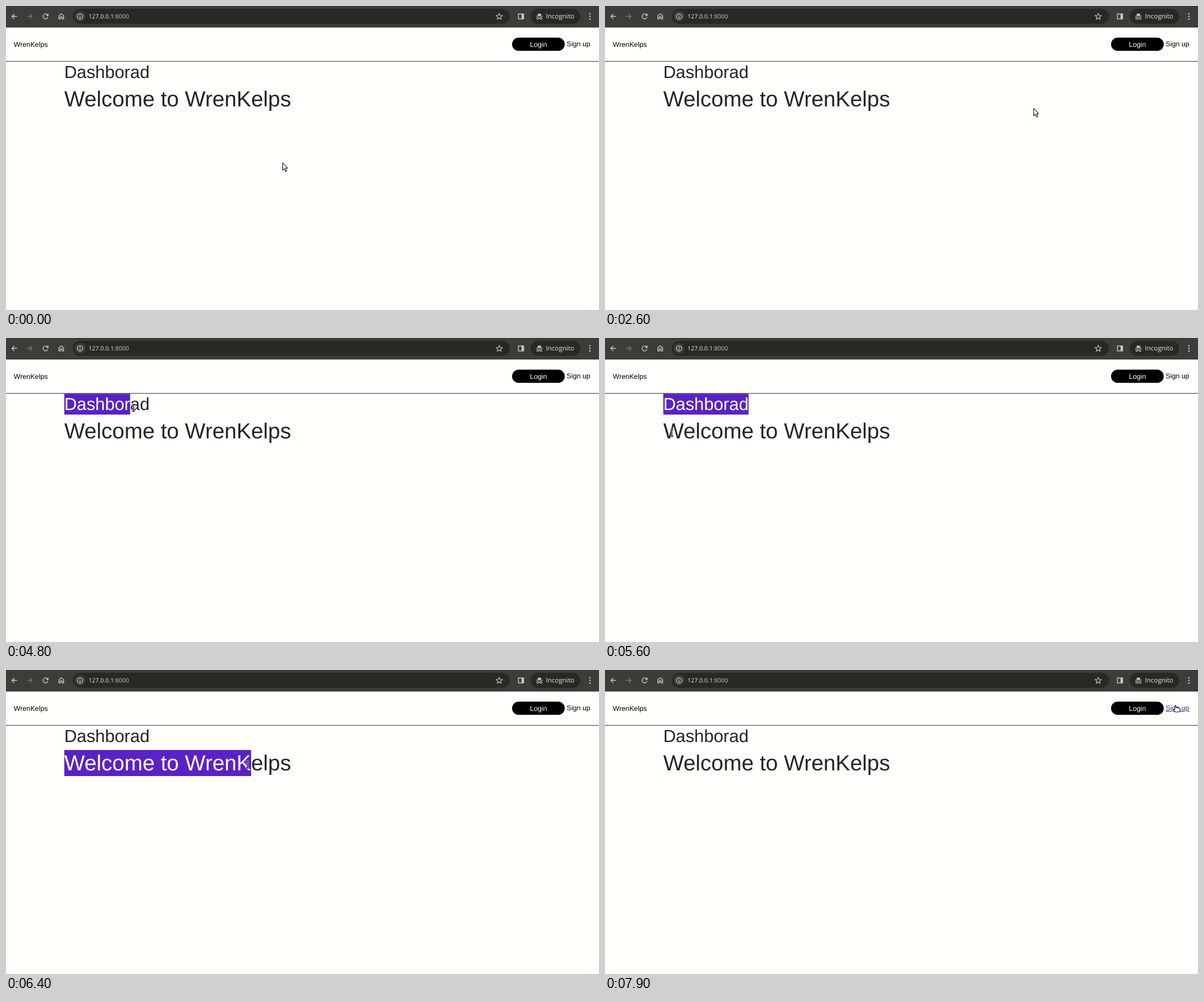
Animation, 1045 px wide and 536 px high, one loop 8 s. Source, as an HTML page:

```html
<!DOCTYPE html>
<html lang="en">
<head>
<meta charset="utf-8">
<title>Dashboard</title>
<style>
  html, body { margin: 0; width: 100%; height: 100%; overflow: hidden; background: #fffffb; }
  svg { display: block; width: 1045px; height: 536px; }
  text { font-family: "Liberation Sans", Arial, sans-serif; text-rendering: geometricPrecision; }
  .bar text { font-family: "Open Sans", "Noto Sans", sans-serif; fill: #e6e6e2; }
  .nav { font-size: 12.29px; }
  .h2 { font-size: 30.72px; }
  .h1 { font-size: 38.4px; }
  .icon { fill: none; stroke: #cbcbc6; stroke-width: 1.4; }
  .dim { stroke: #787874; }
  .thin { stroke-width: 1.1; }
  .dark { fill: #212529; }
  .hover { fill: #2b3f92; text-decoration: underline; }
  #cursors path { stroke-linejoin: round; }
</style>
</head>
<body>
<svg viewBox="0 0 1045 536">
  <rect width="1045" height="536" fill="#fffffb"/>

  <g class="bar">
    <rect width="1045" height="37.6" fill="#3c3c38"/>
    <rect width="1045" height="1" fill="#32322f"/>
    <rect y="36.6" width="1045" height="1" fill="#2b2b28"/>
    <rect x="117.5" y="5" width="770.5" height="26.5" rx="13.25" fill="#282824"/>
    <rect x="924.5" y="5" width="87.5" height="26.5" rx="13.25" fill="#282824"/>
    <circle cx="130.5" cy="18.3" r="9.5" fill="#3c3c38"/>
    <g class="icon">
      <path d="M19.5 18.3H10.5M14.7 13.9L10.3 18.3L14.7 22.7"/>
      <path class="dim" d="M37 18.3H46M41.8 13.9L46.2 18.3L41.8 22.7"/>
      <path d="M73.3 15.6A4.4 4.4 0 1 0 74 19.6M74.2 13.3V16.8H70.6"/>
      <path d="M93.3 22.9V17L97.4 13.8L101.5 17V22.9H98.9V19.2H95.9V22.9Z"/>
      <circle cx="130.5" cy="18.3" r="4.7"/>
      <path d="M130.5 17.7V21M130.5 15.5V16.8"/>
      <path class="thin" d="M869.2 13L870.7 16.6L874.6 16.9L871.6 19.5L872.5 23.3L869.2 21.2L865.9 23.3L866.8 19.5L863.8 16.9L867.7 16.6Z"/>
      <rect x="903" y="14" width="9" height="8.8"/>
      <g class="thin">
        <path d="M934 18H946M939 21.2H941"/>
        <circle cx="937.2" cy="21.8" r="1.8"/>
        <circle cx="942.8" cy="21.8" r="1.8"/>
      </g>
    </g>
    <g fill="#cbcbc6">
      <rect x="908.5" y="14" width="4" height="9"/>
      <path d="M936.5 17L937.6 13.2L940 13.8L942.4 13.2L943.5 17Z"/>
      <circle cx="1029" cy="13.7" r="1.3"/>
      <circle cx="1029" cy="18.3" r="1.3"/>
      <circle cx="1029" cy="22.9" r="1.3"/>
    </g>
    <text x="145.5" y="22" font-size="10.5">127.0.0.1<tspan fill="#c2c2be">:8000</tspan></text>
    <text x="951.5" y="22" font-size="11.5">Incognito</text>
  </g>

  <g class="nav">
    <text x="13.8" y="71.6">WrenKelps</text>
    <rect x="891.8" y="55.8" width="92.8" height="23.3" rx="11.65"/>
    <text x="923.3" y="71.6" fill="#fff">Login</text>
    <text id="signup" x="988" y="71">Sign up</text>
  </g>
  <rect y="97.2" width="1045" height="0.96" class="dark"/>

  <text id="title" class="h2 dark" x="102.7" y="127">Dashborad</text>
  <text id="welcome" class="h1 dark" x="102.7" y="177">Welcome to WrenKelps</text>

  <clipPath id="clip"><rect id="clipBox"/></clipPath>
  <g id="selection" clip-path="url(#clip)" fill="#fff">
    <rect width="1045" height="536" fill="#5a22c4"/>
    <text class="h2" x="102.7" y="127">Dashborad</text>
    <text class="h1" x="102.7" y="177">Welcome to WrenKelps</text>
  </g>

  <g id="cursors" fill="#fff" stroke="#111" stroke-width="1.1">
    <path id="arrow" d="M.5 .5V13.6L3.5 10.8L5.6 15.7L7.8 14.7L5.7 10H9.3Z"/>
    <g id="beam" fill="none">
      <path d="M-2.5 -6H2.5M-2.5 6H2.5M0 -6V6" stroke="#fff" stroke-width="2.8"/>
      <path d="M-2.5 -6H2.5M-2.5 6H2.5M0 -6V6" stroke-width="1.4"/>
    </g>
    <path id="hand" d="M-1 1Q0 -.5 1 1V4.5Q4 3.6 5 5Q8 4.7 8.5 7V9.5L7 12H0L-3.7 8.5Q-4 7 -2.5 7L-1 8Z"/>
  </g>
</svg>
<script>
const $ = id => document.getElementById(id);
const LOOP = 8000, STEP = 100;
const RESTS = [28, 44, 57, 67, 69, 72];   // steps in which the pointer stands still
const CIRCLING = 36, DRAG_TITLE = 44, TITLE_DONE = 48, DRAG_WELCOME = 55, RELEASED = 64;

// Widening counter-clockwise loops, drifting to the right
function circling(n) {
  const grow = Math.min(1, n / 14);
  const angle = (45 * (n - 1) - 6) * Math.PI / 180;
  return {
    x: 470 + 3.95 * (n - 1) + 240 * grow * Math.cos(angle),
    y: 275 - 0.4 * (n - 1) - 135 * grow * Math.sin(angle)
  };
}

// Stops of the pointer after the loops
const stop = (n, x, y) => ({ n, x, y });
const stops = [
  { n: CIRCLING, ...circling(CIRCLING) },
  stop(38, 412, 125), stop(40, 250, 178), stop(42, 115, 130),
  stop(DRAG_TITLE, 106, 120), stop(TITLE_DONE, 344, 125),
  stop(51, 164, 161), stop(54, 118, 167),
  stop(DRAG_WELCOME, 124, 167), stop(63, 481, 167), stop(RELEASED, 480, 163),
  stop(66, 636, 179), stop(73, 1005, 62)
];

function pointer(n) {
  if (n <= CIRCLING) return circling(Math.max(n, 1));
  const i = stops.findIndex(p => p.n >= n);
  const a = stops[i - 1], b = stops[i];
  const u = (n - a.n) / (b.n - a.n), ease = u * u * (3 - 2 * u);
  return { x: a.x + (b.x - a.x) * ease, y: a.y + (b.y - a.y) * ease };
}

// Nearest letter edge to x
function letterEdge(text, x) {
  let best = text.getStartPositionOfChar(0).x;
  for (let i = 0; i < text.getNumberOfChars(); i++) {
    const edge = text.getEndPositionOfChar(i).x;
    if (Math.abs(edge - x) < Math.abs(best - x)) best = edge;
  }
  return best;
}

function select(text, x, top, bottom) {
  const box = { x: 102.7, y: top, width: letterEdge(text, x) - 102.7, height: bottom - top };
  for (const k in box) $("clipBox").setAttribute(k, box[k]);
}

const show = (id, on) => $(id).style.display = on ? "" : "none";
const inside = ({ x, y }, l, t, r, b) => x >= l && x <= r && y >= t && y <= b;

function draw() {
  const step = Math.floor(performance.now() % LOOP / STEP);
  const n = step - RESTS.filter(r => r <= step).length;
  const p = pointer(n);

  const titleOn = n >= DRAG_TITLE && n < DRAG_WELCOME;
  const welcomeOn = n >= DRAG_WELCOME && n <= RELEASED;
  show("selection", titleOn || welcomeOn);
  if (titleOn) select($("title"), n < TITLE_DONE ? p.x : Infinity === n ? 0 : 1045, 98.2, 135);
  if (welcomeOn) select($("welcome"), p.x, 141, 187);

  const onSignup = inside(p, 988, 57, 1030, 77);
  const onLogin = inside(p, 892, 56, 984, 79);
  const onText = inside(p, 103, 98, 252, 135) || inside(p, 103, 141, 500, 187);
  const dragging = n >= DRAG_TITLE && n <= TITLE_DONE;
  const shape = onSignup || onLogin ? "hand"
    : dragging || onText && n < RELEASED ? "beam" : "arrow";

  $("signup").setAttribute("class", onSignup ? "hover" : "");
  for (const id of ["arrow", "beam", "hand"]) show(id, id === shape);
  $("cursors").setAttribute("transform", `translate(${Math.round(p.x)} ${Math.round(p.y)})`);
  requestAnimationFrame(draw);
}
draw();
</script>
</body>
</html>
```
